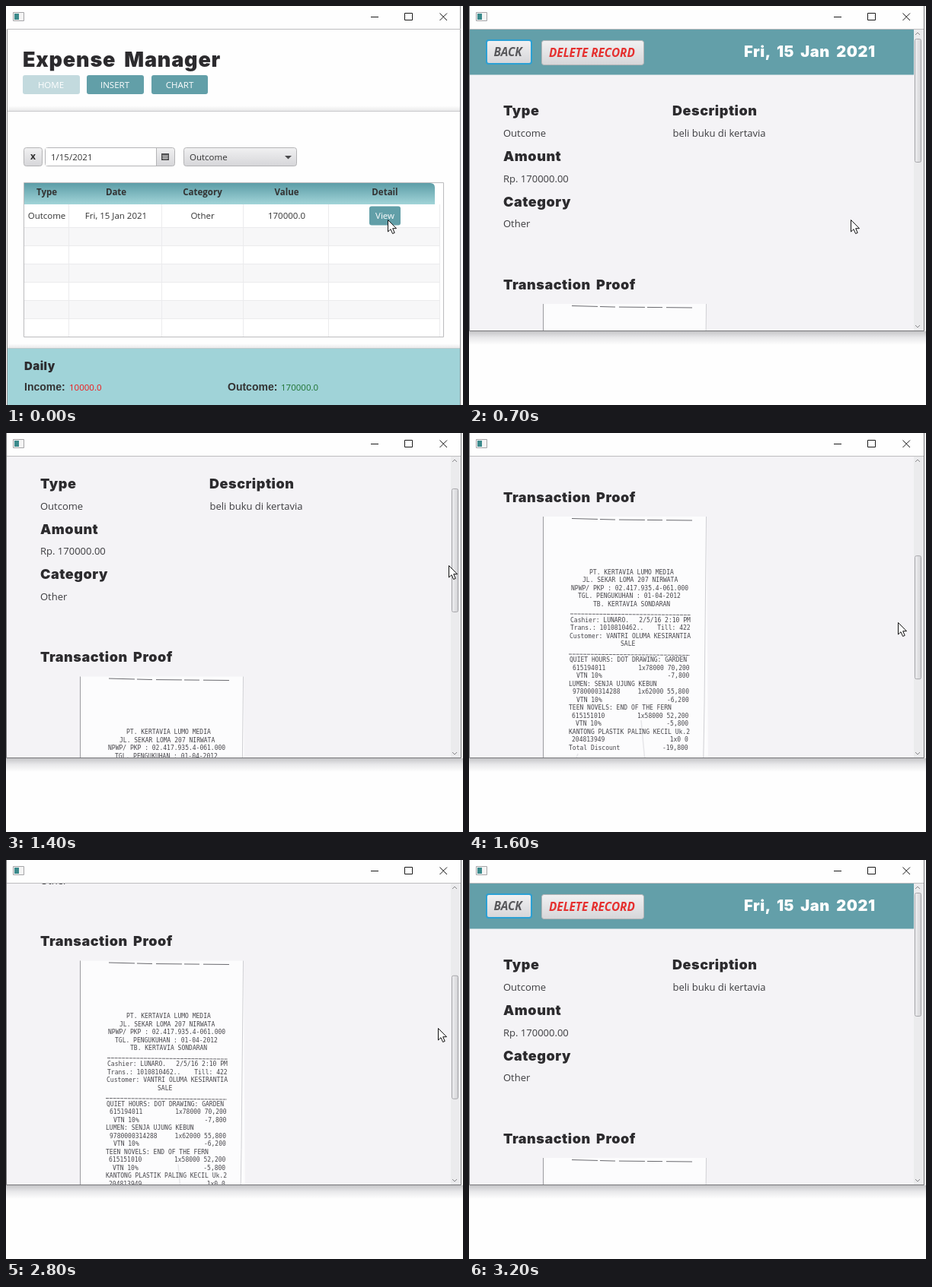
An HTML page for the animation above (3300 ms loop, 600x525 px).

```html
<!DOCTYPE html>
<html lang="en">
<head>
<meta charset="utf-8">
<title>Expense Manager</title>
<style>
  html, body { margin: 0; width: 100%; height: 100%; overflow: hidden; background: #fefefe; }
  svg { display: block; width: 600px; height: 525px; }
  text { font: 11.5px "Open Sans", "Noto Sans", sans-serif; fill: #333; white-space: pre; }
  .mid { text-anchor: middle; }
  .end { text-anchor: end; }
  .bold { font-weight: 700; }
  .white { fill: #fff; }
  .body { font-size: 13px; fill: #3d3d40; }
  .head { font: 900 18px Inter, "Liberation Sans", sans-serif; letter-spacing: .03em; word-spacing: .18em; fill: #2c2b2e; }
  .label { font: bold 14px "Liberation Sans", Arial, sans-serif; }
  .action { font: italic 700 15.3px "Open Sans", "Noto Sans", sans-serif; }
  .receipt text { font: 8px "DejaVu Sans Mono", monospace; fill: #47464b; }
  .teal { fill: #629fa8; }
  .control { fill: url(#grey); stroke: #b4b4b6; }
</style>
</head>
<body>
<svg viewBox="0 0 600 525">
  <defs>
    <linearGradient id="grey" x2="0" y2="1"><stop stop-color="#f1f1f2"/><stop offset="1" stop-color="#d6d6d9"/></linearGradient>
    <linearGradient id="tableHead" x2="0" y2="1"><stop stop-color="#5c9da7"/><stop offset="1" stop-color="#a2d4d8"/></linearGradient>
    <linearGradient id="edge" x2="0" y2="1"><stop stop-color="#fff"/><stop offset="1" stop-color="#e9e9ea"/></linearGradient>
    <linearGradient id="shadow" x2="0" y2="1"><stop stop-color="#c4c4c7"/><stop offset=".45" stop-color="#e8e8ea"/><stop offset="1" stop-color="#fefefe"/></linearGradient>
    <linearGradient id="thumbFill"><stop stop-color="#f0f0f2"/><stop offset="1" stop-color="#d2d2d5"/></linearGradient>
    <clipPath id="view"><path d="M1 31H584V427H1Z"/></clipPath>
  </defs>

  <g id="home">
    <path fill="url(#edge)" d="M2 131H596V138H2Z"/>
    <path fill="none" stroke="#c9c9cb" d="M2 138.5H596"/>
    <text class="head" x="22" y="80" style="font-size:27px">Expense Manager</text>
    <rect x="22" y="91" width="75" height="25" rx="3" fill="#c3dade"/>
    <rect class="teal" x="106" y="91" width="75" height="25" rx="3"/>
    <rect class="teal" x="191" y="91" width="74" height="25" rx="3"/>
    <g class="mid">
      <text class="white" x="59" y="108">HOME</text>
      <text class="white" x="143" y="108">INSERT</text>
      <text class="white" x="228" y="108">CHART</text>
    </g>

    <rect class="control" x="23.5" y="186.5" width="24" height="24" rx="3"/>
    <text class="mid bold" x="35.5" y="202" style="font-size:12px">x</text>
    <rect class="control" x="51.5" y="186.5" width="170" height="24" rx="3"/>
    <path fill="#fff" d="M52 187H197V210H52Z"/>
    <path stroke="#b4b4b6" d="M197.5 187V210"/>
    <text x="59" y="203">1/15/2021</text>
    <path fill="#4a4a4c" d="M204 194H214V203H204Z"/>
    <path stroke="#ddd" stroke-width=".7" d="M205 196.5H213M205 198.5H213M205 200.5H213M207 197V202M209 197V202M211 197V202"/>
    <rect class="control" x="233.5" y="186.5" width="148" height="24" rx="3"/>
    <text x="241" y="203">Outcome</text>
    <path fill="#4a4a4c" d="M366 197H375L370.5 201.5Z"/>

    <path fill="#fff" stroke="#bcbcbe" d="M23.5 232.5H574.5V435.5H23.5Z"/>
    <path fill="url(#tableHead)" d="M24 233H557Q563 233 563 239V261H24Z"/>
    <path fill="#f7f7f8" d="M24 291H570V315H24ZM24 339H570V363H24ZM24 387H570V411H24Z"/>
    <path stroke="#ebebed" d="M24 291.5H570M24 315.5H570M24 339.5H570M24 363.5H570M24 387.5H570M24 411.5H570M82.5 261V435M204.5 261V435M311.5 261V435M423.5 261V435M569.5 261V435"/>
    <rect class="teal" x="477" y="263.5" width="41" height="25" rx="3"/>
    <g id="table" class="mid"></g>

    <path fill="#a0d3d8" d="M2 450H596V525H2Z"/>
    <path fill="url(#edge)" d="M2 444H596V450H2Z"/>
    <path stroke="#bcc9cb" d="M2 450.5H596"/>
    <text class="head" x="24" y="479" style="font-size:15px">Daily</text>
    <text class="label" x="24" y="506">Income:</text>
    <text x="83" y="506" style="fill:#f01818">10000.0</text>
    <text class="label" x="291" y="506">Outcome:</text>
    <text x="361" y="506" style="fill:#1d7230">170000.0</text>
    <path stroke="#8c8c8e" d="M1.5 30V525M596.5 0V525"/>
  </g>

  <g id="detail">
    <path fill="url(#shadow)" d="M0 428H600V446H0Z"/>
    <path fill="#f4f3f6" d="M1 31H597V427H1Z"/>
    <g clip-path="url(#view)">
      <g id="page">
        <path fill="#639fa9" d="M1 31H584V90.5H1Z"/>
        <rect x="23" y="45" width="59" height="31" rx="3" fill="url(#grey)" stroke="#2ba0d4" stroke-width="2"/>
        <text class="action" x="32.5" y="66" style="fill:#58585b">BACK</text>
        <rect class="control" x="95.5" y="45.5" width="134" height="32" rx="3"/>
        <text class="action" x="105" y="66.5" style="fill:#e5302f">DELETE RECORD</text>
        <text class="head" x="361" y="67" style="font-size:20px;fill:#fff">Fri, 15 Jan 2021</text>
        <text class="head" x="45" y="144">Type</text>
        <text class="body" x="45" y="172">Outcome</text>
        <text class="head" x="45" y="204">Amount</text>
        <text class="body" x="45" y="231.5">Rp. 170000.00</text>
        <text class="head" x="45" y="263.5">Category</text>
        <text class="body" x="45" y="291">Other</text>
        <text class="head" x="267" y="144">Description</text>
        <text class="body" x="267.5" y="172">beli buku di kertavia</text>
        <text class="head" x="45" y="372.5">Transaction Proof</text>
        <g id="receipt" class="receipt" fill="none">
          <path fill="#fcfcfd" d="M98 392H312L315 886H98Z"/>
          <path stroke="#9c9ca0" d="M97.5 392V886"/>
          <path stroke="#cfcfd3" d="M311.5 392L309 640 305 872"/>
          <path stroke="#6a6a6f" stroke-dasharray="34 3 20 5" d="M135 394.5L190 396 294 397"/>
          <path stroke="#66656a" stroke-dasharray="4 .8" d="M133 520L291 521.5M131 573L290 574.5M124 876.5L300 879.5"/>
          <path stroke="#58585c" stroke-width="2" d="M98 886.5H315"/>
          <path stroke="#c2c2c6" stroke-width="1.5" d="M132 734L119 764M231 709L240 716"/>
          <path stroke="#e6e6e9" stroke-width="1.5" d="M143 704L132 734M226 660L238 790"/>
        </g>
      </g>
    </g>
    <path fill="#ebebed" d="M584 31H597V427H584Z"/>
    <path fill="none" stroke="#88888b" d="M586 38L589 35 592 38M586 420L589 423 592 420"/>
    <rect id="thumb" x="585.5" y="43.5" width="8" height="162" rx="2" fill="url(#thumbFill)" stroke="#a6a6aa"/>
    <path fill="none" stroke="#77777a" d="M.5 0V427.5H597.5V0"/>
  </g>

  <g fill="none" stroke="#1a1a1a">
    <path stroke="#bdbdbf" d="M1 30.5H597"/>
    <path fill="#f4f4f4" stroke="#a5a5a8" d="M9.5 8.5H23.5V19.5H9.5Z"/>
    <path fill="#3c8a8c" stroke="none" d="M11 10H17V18H11Z"/>
    <path d="M479 14.5H489M523.5 9.5H533.5V18.5H523.5ZM569.5 9.5L579 19M579 9.5L569.5 19"/>
  </g>
  <path id="cursor" fill="#fff" stroke="#111" stroke-linejoin="round" d="M.5 .5V16L4 12.7 6.6 18.5 9.2 17.4 6.7 11.7H11.5Z"/>
</svg>
<script>
const $ = id => document.getElementById(id);

function addText(parent, x, y, content, cls = "") {
  const node = document.createElementNS("http://www.w3.org/2000/svg", "text");
  node.setAttribute("x", x);
  node.setAttribute("y", y);
  node.setAttribute("class", cls);
  node.textContent = content;
  parent.append(node);
}

[
  [53.5, "Type", "Outcome"],
  [144.5, "Date", "Fri, 15 Jan 2021"],
  [258, "Category", "Other"],
  [368.5, "Value", "170000.0"],
  [497.5, "Detail", "View"]
].forEach(([x, title, value]) => {
  addText($("table"), x, 249, title, "bold");
  addText($("table"), x, 280, value, value === "View" ? "white" : "");
});

// Receipt rows: left x, text, right-aligned text; null leaves a gap.
const rows = [
  [158, "PT. KERTAVIA LUMO MEDIA"],
  [149, "JL. SEKAR LOMA 207 NIRWATA"],
  [134, "NPWP/ PKP : 02.417.935.4-061.000"],
  [143, "TGL. PENGUKUHAN : 01-04-2012"],
  [163, "TB. KERTAVIA SONDARAN"],
  null,
  [133, "Cashier: LUNARO.", "2/5/16 2:10 PM"],
  [133, "Trans.: 1010810462..", "Till: 422"],
  [132, "Customer: VANTRI OLUMA KESIRANTIA"],
  [199, "SALE"],
  null,
  [132, "QUIET HOURS: DOT DRAWING: GARDEN"],
  [136, "615194011", "1x78000 70,200"],
  [141, "VTN 10%", "-7,800"],
  [131, "LUMEN: SENJA UJUNG KEBUN"],
  [136, "9780000314288", "1x62000 55,800"],
  [141, "VTN 10%", "-6,200"],
  [131, "TEEN NOVELS: END OF THE FERN"],
  [135, "615151010", "1x58000 52,200"],
  [140, "VTN 10%", "-5,800"],
  [131, "KANTONG PLASTIK PALING KECIL Uk.2"],
  [135, "204813949", "1x0 0"],
  [131, "Total Discount", "-19,800"],
  null,
  [130, "Total", "178,200"],
  [139, "Debit Card (D)", "178,200"],
  [148, "Account:    0000"],
  [148, "Auth: 111111 (M)"],
  [128, "Total Tender", "178,200"],
  [128, "Change Due", "0"],
  null,
  [127, "BKP: 198000", "DISC: 19800"],
  [127, "DPP: 162000", "PPN: 16200"],
  [127, "Bebas PPN: 0"],
  null,
  [165, "Beli Buku, Click"],
  [164, "kertavia.example"],
  [174, "TERIMA KASIH"],
  [174, "Customer Copy"]
];
rows.forEach((row, i) => {
  if (!row) return;
  const [x, left, right] = row, y = 467.5 + i * 10.52;
  addText($("receipt"), x, y, left);
  if (right) addText($("receipt"), 292 - i * .2, y, right, "end");
});

const LOOP = 3300, STEP = 100, OPEN_AT = 300;
const MAX_SCROLL = 472.5, THUMB_TRAVEL = 198;

// Keys are [time, value, ...]
const scrollKeys = [[1200, 0], [1300, 20], [1400, 71.5], [1600, 282], [1700, 377], [1800, 440],
  [1900, 466], [2000, MAX_SCROLL], [2700, MAX_SCROLL], [2800, 259.5], [2900, 105], [3000, 18], [3100, 0]];
const cursorKeys = [[700, 501, 281], [900, 535, 225], [1200, 586, 131], [1300, 585, 146], [1400, 581, 174],
  [1600, 563, 249], [1800, 559, 320], [2000, 559, 329], [2700, 559, 329], [2800, 567, 221],
  [3000, 588, 131], [3200, 612, 110]];

function sample(keys, time) {
  const next = keys.findIndex(key => key[0] > time);
  if (next < 0) return keys[keys.length - 1].slice(1);
  if (next === 0) return keys[0].slice(1);
  const a = keys[next - 1], b = keys[next], k = (time - a[0]) / (b[0] - a[0]);
  return a.slice(1).map((v, i) => v + (b[i + 1] - v) * k);
}

function draw(now) {
  const time = Math.floor(now % LOOP / STEP) * STEP;
  const opened = time >= OPEN_AT;
  const [scroll] = sample(scrollKeys, time);
  $("home").style.display = opened ? "none" : "";
  $("detail").style.display = opened ? "" : "none";
  $("page").setAttribute("transform", `translate(0 ${-scroll})`);
  $("thumb").setAttribute("y", 43.5 + scroll / MAX_SCROLL * THUMB_TRAVEL);
  $("cursor").setAttribute("transform", `translate(${sample(cursorKeys, time)})`);
  requestAnimationFrame(draw);
}
draw(performance.now());
</script>
</body>
</html>
```
